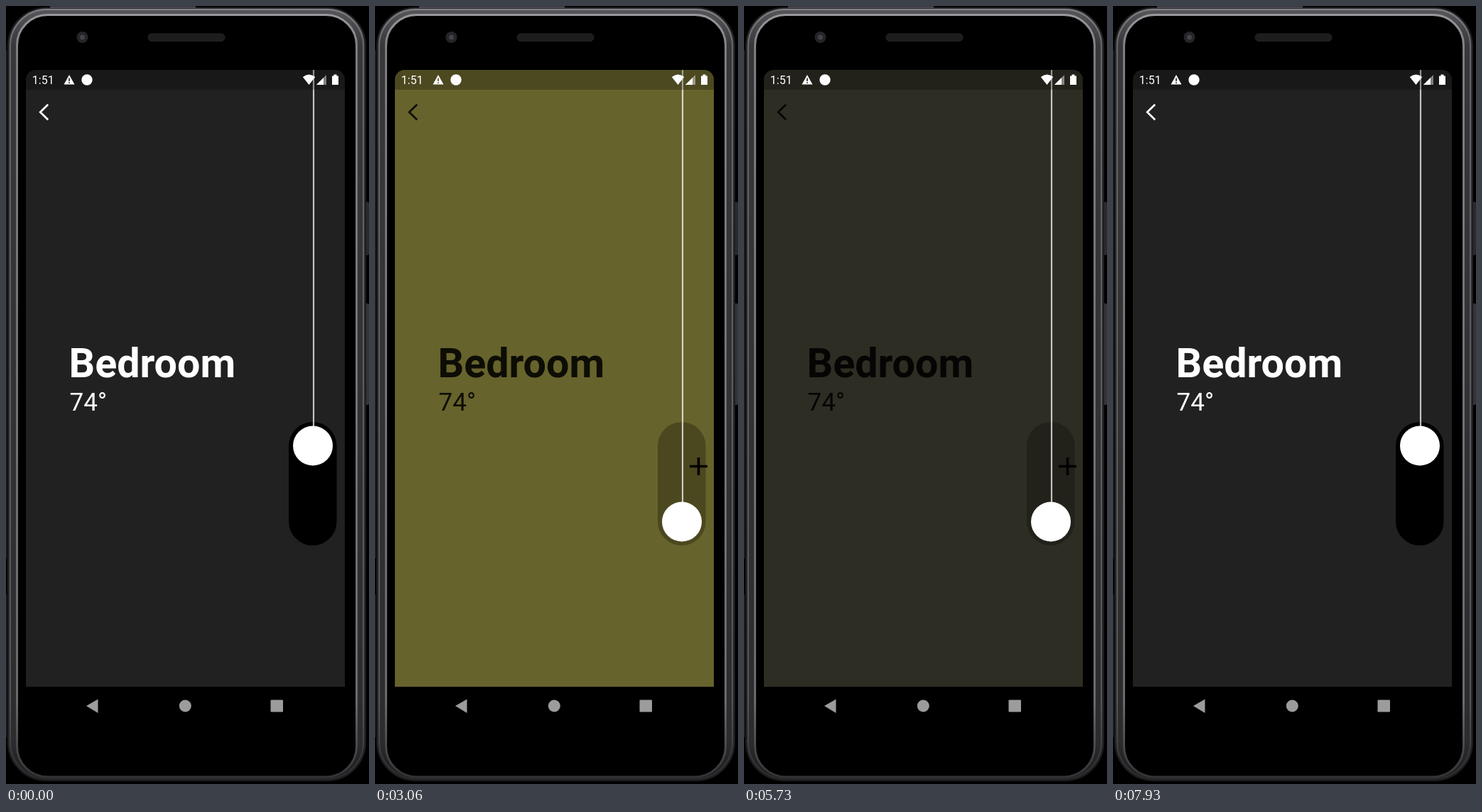
Animation of 511 by 1096 pixels, one loop 8.12 s. Source, as an HTML page:

```html
<!DOCTYPE html>
<html lang="en">
<head>
<meta charset="utf-8">
<title>Room light switch</title>
<style>
html, body { margin: 0; width: 100%; height: 100%; overflow: hidden; background: #000; }
svg { display: block; width: 511px; height: 1096px; }
text { font-family: Roboto, sans-serif; }
</style>
</head>
<body>
<svg viewBox="0 0 511 1096" xmlns="http://www.w3.org/2000/svg">
  <defs>
    <linearGradient id="rim" x1="0" y1="0" x2="0" y2="1">
      <stop offset="0" stop-color="#97979c"/>
      <stop offset=".05" stop-color="#7b7b80"/>
      <stop offset=".9" stop-color="#6a6a6e"/>
      <stop offset="1" stop-color="#333336"/>
    </linearGradient>
    <linearGradient id="band" x1="0" y1="0" x2="0" y2="1">
      <stop offset="0" stop-color="#58585c"/>
      <stop offset=".05" stop-color="#38383b"/>
      <stop offset=".95" stop-color="#2c2c2e"/>
      <stop offset="1" stop-color="#1c1c1e"/>
    </linearGradient>
    <clipPath id="glass"><path d="M28 959V104a14 14 0 0 1 14-14H463a14 14 0 0 1 14 14V959Z"/></clipPath>
  </defs>

  <rect width="511" height="1096"/>
  <g id="phone">
    <path d="M.5 62V778M.5 829V1030" stroke="#29292b"/>
    <rect x="505" y="276" width="6" height="75" rx="2" fill="#2a2a2c"/>
    <rect x="505" y="419" width="6" height="143" rx="2" fill="#343436"/>
    <rect x="3" y="2.5" width="503" height="1088.500" rx="54" fill="url(#band)" stroke="#1e1e20" stroke-width="2"/>
    <path d="M62 1.5H267" stroke="#5a5763" stroke-width="2"/>
    <rect x="6" y="5" width="497" height="1083.500" rx="51" fill="none" stroke="url(#rim)" stroke-opacity=".65" stroke-width="2"/>
    <rect x="15.500" y="12.500" width="478" height="1073.500" rx="43" fill="#000" stroke="url(#rim)" stroke-width="3"/>
    <rect x="200" y="39" width="108" height="10.500" rx="5" fill="#1d1d1d" stroke="#232323"/>
    <circle cx="107.500" cy="44" r="8" fill="#252527"/>
    <circle cx="107.500" cy="44" r="3.500" fill="#424249"/>
  </g>
  <g fill="#9c9c9c">
    <path d="M113 986L129.500 976.500V996Z"/>
    <circle cx="252.300" cy="986" r="8.500"/>
    <rect x="372.500" y="977.500" width="17.500" height="17" rx="1"/>
  </g>

  <g clip-path="url(#glass)">
    <rect id="wall" x="28" y="90" width="449" height="869"/>
    <g id="ink">
      <path d="M59.200 138.800L48.200 149.500L59.200 160.200" fill="none" stroke="currentColor" stroke-width="2.700"/>
      <text x="88.600" y="523.300" font-size="57.400" font-weight="700" fill="currentColor">Bedroom</text>
      <text x="89.600" y="569.700" font-size="35" fill="currentColor">74°</text>
    </g>
    <rect id="track" x="398" y="586" width="67.500" height="174" rx="33.750"/>
    <path id="cord" stroke="#fff" stroke-opacity=".73" stroke-width="2.200"/>
    <circle id="knob" cx="432" r="28" fill="#fff"/>
    <rect x="28" y="90" width="449" height="28" fill-opacity=".26"/>
    <g fill="#fff">
      <text x="36.800" y="110" font-size="16">1:51</text>
      <path d="M81.500 110.500L89 97L96.500 110.500Z"/>
      <path id="mark" d="M89 101.500V106M89 107.300V109" stroke-width="1.600"/>
      <circle cx="114" cy="104" r="7.700"/>
      <path d="M417.800 100Q426.500 93 435.200 100L426.500 111Z"/>
      <path d="M437 111L451 97V111Z" fill-opacity=".45"/>
      <path d="M437 111L447 101V111Z"/>
      <path d="M459 98.500H461.500V96.500H465.500V98.500H468V111H459Z"/>
    </g>
  </g>
  <path id="cursor" d="M-12.500 0H12.500M0-12.500V12.500" stroke="#000" stroke-width="3.600"/>
</svg>
<script>
const LOOP = 8120;
const KNOB_MS = 200, FADE_DELAY = 336, FADE_MS = 400;
const DARK = [33, 33, 33], LIT = [255, 245, 68];
const toggles = [[2600, 1], [3934, 0], [5372, 1], [6744, 0]];

// time, x, y
const path = [
  [0, 440, -30], [600, 440, -30], [1060, 455, 9], [1400, 455, 9],
  [1800, 484, 330], [2080, 462, 655], [2200, 453.5, 645], [2260, 454, 645],
  [2400, 455.5, 646.5], [2860, 455.5, 646.5], [3000, 455.5, 648.5],
  [7200, 455.5, 648.5], [7860, 490, 604], [7930, 540, 590], [LOOP, 540, 590]
];

const el = id => document.getElementById(id);
const clamp = v => Math.min(1, Math.max(0, v));
const ease = v => v * v * (3 - 2 * v);
const mix = (a, b, p) => a + (b - a) * p;

// 0 = off, 1 = on; each toggle replaces the state before it
function level(t, delay, ms, curve) {
  let v = 0;
  for (const [at, to] of toggles) v = mix(v, to, curve(clamp((t - at - delay) / ms)));
  return v;
}

function cursorAt(t) {
  const i = Math.max(1, path.findIndex(p => p[0] > t));
  const a = path[i - 1], b = path[i];
  const p = ease((t - a[0]) / (b[0] - a[0]));
  return [mix(a[1], b[1], p), mix(a[2], b[2], p)];
}

function draw(t) {
  const on = level(t, 0, KNOB_MS, ease);
  const glow = level(t, FADE_DELAY, FADE_MS, v => v);
  const rgb = DARK.map((c, i) => Math.round(mix(c, LIT[i], glow)));
  const shade = Math.round(255 * (1 - on));
  const y = mix(619.5, 726.5, on);

  el("wall").setAttribute("fill", `rgb(${rgb})`);
  el("mark").setAttribute("stroke", `rgb(${rgb.map(c => Math.round(c * 0.74))})`);
  el("ink").style.color = `rgba(${shade},${shade},${shade},${mix(1, 0.87, on)})`;
  el("track").setAttribute("fill-opacity", mix(1, 0.27, on));
  el("knob").setAttribute("cy", y);
  el("cord").setAttribute("d", `M433 90V${y - 20}`);
  el("cursor").setAttribute("transform", `translate(${cursorAt(t)})`);
}

const start = performance.now();
function tick() {
  draw((performance.now() - start) % LOOP);
  requestAnimationFrame(tick);
}
draw(0);
requestAnimationFrame(tick);
</script>
</body>
</html>
```
